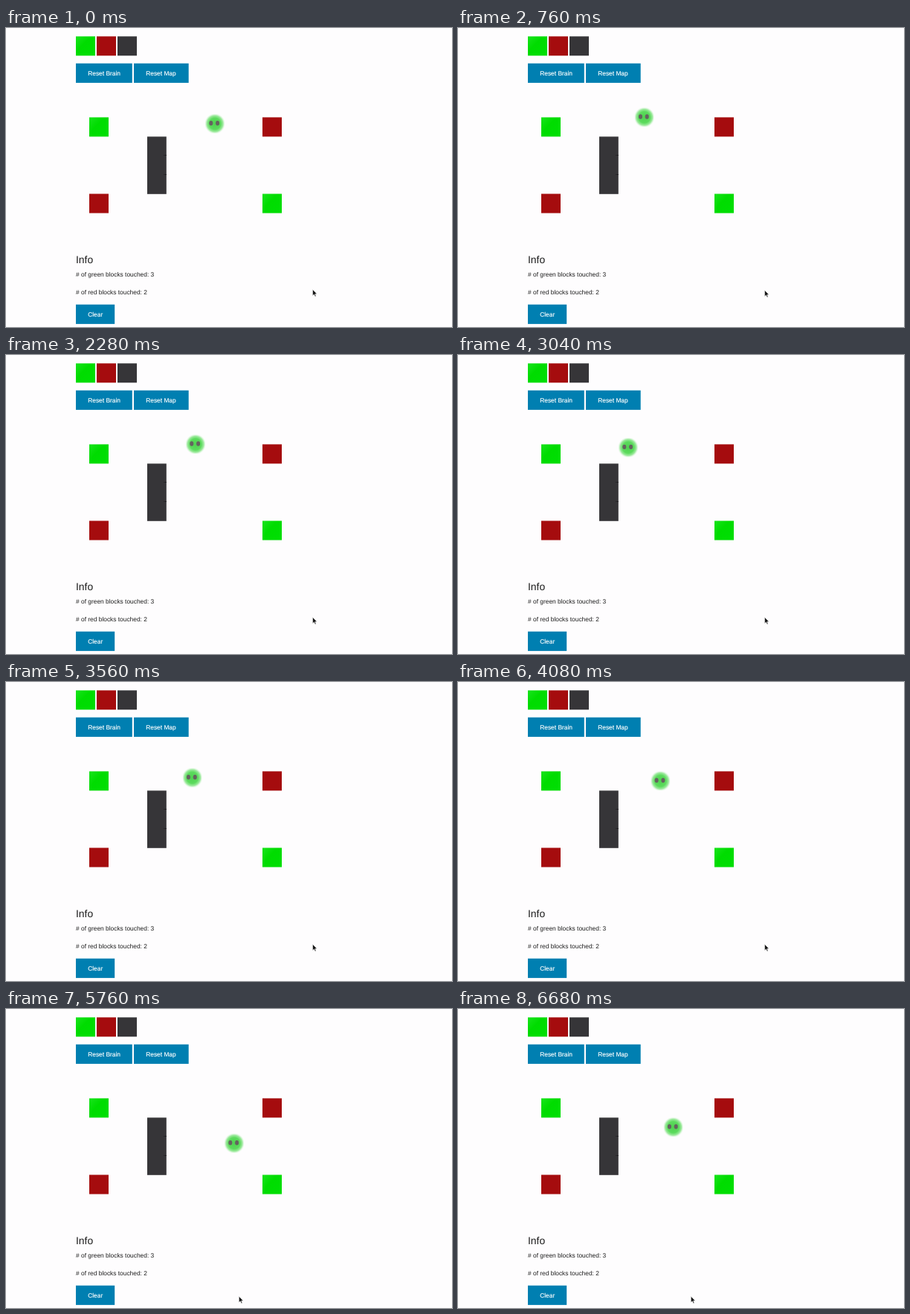
Write an HTML page that moves like this. It is 600 px wide and 403 px high and loops after 6.72 s.

```html
<!DOCTYPE html>
<html lang="en">
<head>
<meta charset="utf-8">
<title>Block world</title>
<style>
  html, body { margin: 0; width: 100%; height: 100%; overflow: hidden; background: #fefdfe; }
  svg { display: block; width: 100%; height: 100%; }
  text { font: 8.4px "Liberation Sans", Arial, sans-serif; fill: #1c1c1c; text-rendering: geometricPrecision; }
  .title { font-size: 13.9px; }
  .button rect { fill: #007fb1; }
  .button text { fill: #fff; stroke: #fff; stroke-width: .15; }
</style>
</head>
<body>
<svg viewBox="0 0 600 403">
  <defs>
    <linearGradient id="lime" x2="1" y2="1">
      <stop offset="0" stop-color="#18e41c"/>
      <stop offset=".4" stop-color="#00dc00"/>
      <stop offset="1" stop-color="#00df04"/>
    </linearGradient>
    <radialGradient id="glow">
      <stop offset="0" stop-color="#4fd050"/>
      <stop offset=".55" stop-color="#5cdb5d"/>
      <stop offset=".78" stop-color="#8ce68c" stop-opacity=".85"/>
      <stop offset="1" stop-color="#d8f7d8" stop-opacity="0"/>
    </radialGradient>
    <clipPath id="cell"><rect x="-13" y="-13" width="26" height="26"/></clipPath>
    <rect id="green" width="26" height="26" fill="url(#lime)"/>
    <rect id="red" width="26" height="26" fill="#a50c0e"/>
    <rect id="wall" width="26" height="26" fill="#363538"/>
  </defs>

  <use href="#green" x="94" y="11.3"/>
  <use href="#red" x="122" y="11.3"/>
  <use href="#wall" x="150" y="11.3"/>

  <g class="button"><rect x="94" y="47.7" width="75.8" height="26.2"/><text x="110.2" y="63.7">Reset Brain</text></g>
  <g class="button"><rect x="172" y="47.7" width="73.7" height="26.2"/><text x="188.2" y="63.7">Reset Map</text></g>

  <use href="#green" x="112" y="120.4"/>
  <use href="#red" x="345" y="120.4"/>
  <use href="#red" x="112" y="223.5"/>
  <use href="#green" x="345" y="223.5"/>
  <rect x="190" y="146.4" width="25.8" height="77.4" fill="#363538"/>
  <path d="M212 171.5h4M212 197.5h4" stroke="#252427"/>

  <text class="title" x="94" y="317.4">Info</text>
  <text x="94" y="335.2"># of green blocks touched: 3</text>
  <text x="94" y="358.6"># of red blocks touched: 2</text>
  <g class="button"><rect x="94" y="372.7" width="52.2" height="26.2"/><text x="110.2" y="388.7">Clear</text></g>

  <g id="blob" clip-path="url(#cell)">
    <circle r="14" fill="url(#glow)"/>
    <g fill="#65625f">
      <ellipse cx="-5.2" cy="-.8" rx="2.5" ry="3.2"/>
      <ellipse cx="3.6" cy="-.8" rx="2.5" ry="3.2"/>
    </g>
  </g>
  <path id="cursor" d="M0 0V8.2L1.9 6.5 3.2 9.5 4.5 8.9 3.2 6H5.7Z" fill="#111" stroke="#fff" stroke-width=".5"/>
</svg>
<script>
  const LOOP = 6720, TICK = 40, STEP = 13 / 3;

  // Walk: time, then whole steps from the starting place.
  const walk = [
    [0, 0, 0], [680, -6, -2], [1560, -12, -4], [2320, -6, -2], [3040, -12, -1],
    [4080, -2, 1], [4480, 6, -2], [4800, 2, -5], [5760, 6, 12], [6240, 12, 10], [6680, 2, 7]
  ];
  const pointer = [
    [0, 412.6, 352.5], [360, 412.6, 352.5], [400, 412.6, 353.5], [5160, 412.6, 353.5],
    [5480, 343, 377], [5640, 317, 393], [5760, 313.4, 387.3]
  ];

  const blob = document.getElementById("blob");
  const cursor = document.getElementById("cursor");

  function along(path, t) {
    const next = path.findIndex(p => p[0] > t);
    if (next < 0) return path[path.length - 1].slice(1);
    const [t0, x0, y0] = path[next - 1], [t1, x1, y1] = path[next];
    const k = (t - t0) / (t1 - t0);
    return [x0 + (x1 - x0) * k, y0 + (y1 - y0) * k];
  }

  function place(node, x, y) {
    node.setAttribute("transform", `translate(${x.toFixed(2)} ${y.toFixed(2)})`);
  }

  function draw() {
    const t = Math.floor(performance.now() % LOOP / TICK) * TICK;
    const [col, row] = along(walk, t).map(Math.round);
    place(blob, 281 + col * STEP, 129 + row * STEP);
    place(cursor, ...along(pointer, t));
    requestAnimationFrame(draw);
  }
  draw();
</script>
</body>
</html>
```
